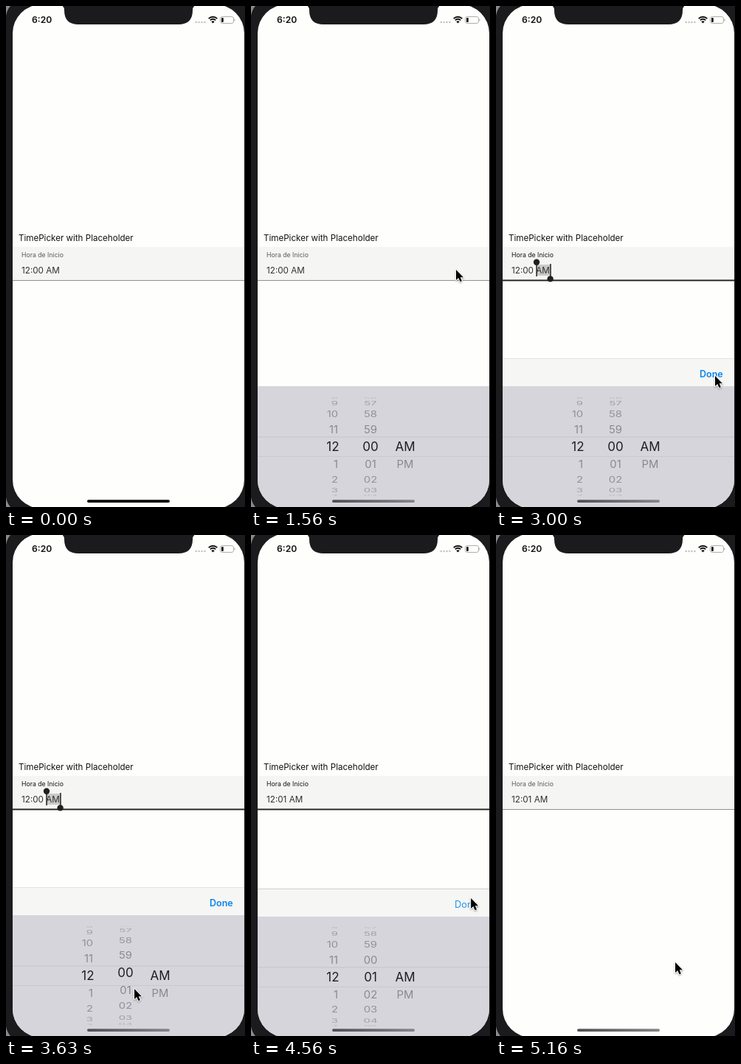
An HTML page with a canvas that plays this animation: 324x680 px, repeating every 5.2 s.

```html
<!DOCTYPE html>
<html lang="es">
<head>
<meta charset="utf-8">
<title>TimePicker</title>
<style>
html, body { margin: 0; width: 100%; height: 100%; overflow: hidden; background: #1b1b1d; }
canvas { display: block; width: 324px; height: 680px; }
</style>
</head>
<body>
<canvas id="stage"></canvas>
<script>
const W = 324, H = 680, LOOP = 5200;
const canvas = document.getElementById('stage');
const ctx = canvas.getContext('2d');
const dpr = window.devicePixelRatio || 1;
canvas.width = W * dpr;
canvas.height = H * dpr;

const FONT = 'Inter, Roboto, sans-serif';
const OPEN = 1560, PICK = 3600, COMMIT = 4420, CLOSE = 4560;

// Pointer path: time, x, y
const PATH = [
  [60, 318, 351], [160, 295, 355], [300, 295, 355], [430, 278, 358],
  [1975, 278, 358], [2000, 309, 487], [2030, 295, 484], [2190, 295, 484],
  [2330, 283, 595], [2600, 66, 358], [2710, 66, 358], [2990, 297, 502],
  [3050, 297, 502], [3230, 208, 599], [3430, 174, 616], [3950, 174, 616],
  [4150, 297, 493], [4550, 298, 493], [4700, 300, 493], [5060, 305, 642],
  [5160, 243, 580]
];

const clamp = v => Math.max(0, Math.min(1, v));
const ramp = (t, a, b) => clamp((t - a) / (b - a));
const smooth = k => k * k * (3 - 2 * k);
const mix = (a, b, k) => a + (b - a) * k;
const gray = v => `rgb(${v},${v},${v})`;

function rect(x, y, w, h, fill) {
  ctx.fillStyle = fill;
  ctx.fillRect(x, y, w, h);
}

function text(str, x, y, size, fill, weight = 400, align = 'left') {
  ctx.font = `${weight} ${size}px ${FONT}`;
  ctx.textAlign = align;
  ctx.fillStyle = fill;
  ctx.fillText(str, x, y);
}

function disc(x, y, r, fill) {
  ctx.beginPath();
  ctx.arc(x, y, r, 0, Math.PI * 2);
  ctx.fillStyle = fill;
  ctx.fill();
}

function pill(x, y, w, h, r) {
  ctx.beginPath();
  ctx.roundRect(x, y, w, h, r);
}

function clipBox(x, y, w, h, draw) {
  ctx.save();
  ctx.beginPath();
  ctx.rect(x, y, w, h);
  ctx.clip();
  draw();
  ctx.restore();
}

function bezel() {
  rect(0, 0, W, H, '#1b1b1d');
  ctx.fillStyle = '#8b8b8d';
  for (const [y, d] of [[0, 1], [H, -1]]) {
    ctx.beginPath();
    ctx.moveTo(0, y);
    ctx.lineTo(6, y);
    ctx.quadraticCurveTo(1.5, y + 5 * d, 0, y + 13 * d);
    ctx.fill();
  }
}

function notch() {
  ctx.beginPath();
  ctx.moveTo(72, -2);
  ctx.quadraticCurveTo(79, -1, 79, 6);
  ctx.bezierCurveTo(79, 19, 86, 25, 98, 25);
  ctx.lineTo(234, 25);
  ctx.bezierCurveTo(246, 25, 253, 19, 253, 6);
  ctx.quadraticCurveTo(253, -1, 260, -2);
  ctx.fillStyle = '#1b1b1d';
  ctx.fill();
}

function statusBar() {
  text('6:20', 35, 23.3, 12.2, '#111', 600);
  for (let i = 0; i < 4; i++) disc(257.7 + i * 3.9, 22, 1.3, '#c4c4c4');

  ctx.strokeStyle = '#111';
  ctx.lineWidth = 1.9;
  for (const r of [8.2, 5.2]) {
    ctx.beginPath();
    ctx.arc(280.5, 23, r, -Math.PI * 0.75, -Math.PI * 0.25);
    ctx.stroke();
  }
  ctx.beginPath();
  ctx.moveTo(280.5, 23.6);
  ctx.arc(280.5, 23.6, 3.2, -Math.PI * 0.75, -Math.PI * 0.25);
  ctx.fillStyle = '#111';
  ctx.fill();

  pill(290.5, 14.5, 18, 9, 2.6);
  ctx.strokeStyle = '#adadad';
  ctx.lineWidth = 1;
  ctx.stroke();
  rect(309.4, 17.5, 1, 3, '#adadad');
  pill(292, 16, 2.8, 6, 0.8);
  ctx.fillStyle = '#111';
  ctx.fill();
}

function selection(s) {
  const ink = '#202022';
  ctx.globalAlpha = clamp(s * 2);
  rect(55, 351, 19, 15, '#c9c9c9');
  rect(54.3, 350, 1.5, 17, ink);
  rect(73.2, 350, 1.5, 18, ink);
  const r = 4.2 * (s + 0.9 * s * (1 - s));
  disc(55, 347.8, r, ink);
  disc(73.6, 370.4, r, ink);
  ctx.globalAlpha = 1;
}

function field(t, focus) {
  text('TimePicker with Placeholder', 17, 318.5, 11.6, '#111');
  rect(9, 327, 314, 45.5, '#f5f5f4');
  text('Hora de Inicio', 21, 341.4, 8.7, gray(mix(90, 20, focus)));
  rect(9, 372 - 0.5 * focus, 314, 1 + 0.9 * focus, gray(mix(145, 32, focus)));
  if (t >= 2650 && t < COMMIT) selection(smooth(ramp(t, 2640, 2750)));
  text(t < COMMIT ? '12:00 AM' : '12:01 AM', 21, 363, 11.7, '#303032');
}

const hour = i => String((i + 11 + 120) % 12 + 1);
const minute = i => String((i + 60) % 60).padStart(2, '0');
const period = i => ['AM', 'PM'][i] || '';

// One wheel: rows sit on a cylinder seen from the front
function wheel(label, pos, x, align, big) {
  const size = big ? 17 : 14.8;
  const base = Math.round(pos);
  for (let i = base - 4; i <= base + 4; i++) {
    const a = (i - pos) * 0.36;
    const c = Math.cos(a);
    if (c <= 0) continue;
    ctx.save();
    ctx.translate(x, 598.3 + 67 * Math.sin(a));
    ctx.scale(1, c);
    const ink = big ? '#1f1f21' : `rgba(55,55,62,${0.5 * Math.sqrt(c)})`;
    text(label(i), 0, size * 0.364, size, ink, 400, align);
    ctx.restore();
  }
}

function wheels(pos, big) {
  wheel(hour, 12, big ? 119.5 : 118, 'right', big);
  wheel(minute, pos, 162, 'center', big);
  wheel(period, 0, 209, 'center', big);
}

function keyboard(t, focus) {
  if (t < OPEN) return;
  const out = 1 - Math.pow(1 - ramp(t, CLOSE, CLOSE + 320), 3);
  if (out >= 1) return;
  const pos = smooth(ramp(t, PICK - 20, PICK + 160));
  ctx.save();
  ctx.translate(0, 202 * out);

  ctx.globalAlpha = t < CLOSE ? focus : 1;
  rect(9, 478, 314, 38, '#f6f6f5');
  rect(9, 478, 314, 1, gray(t < CLOSE ? 228 : 205));
  const closing = t >= CLOSE;
  text('Done', 276, 504, closing ? 12.8 : 12.5, closing ? '#2196f0' : '#0a84ec', closing ? 400 : 600);
  ctx.globalAlpha = 1;

  rect(9, 516, 314, 170, '#d6d5dc');
  clipBox(9, 516, 314, 69, () => wheels(pos, false));
  clipBox(9, 611, 314, 75, () => wheels(pos, false));
  clipBox(9, 585, 314, 26, () => wheels(pos, true));
  rect(9, 584.5, 314, 1, '#c3c3c9');
  rect(9, 611, 314, 1, '#c9c9cf');
  ctx.restore();
}

function homeBar(t) {
  let ink = '#000';
  if (t >= OPEN) {
    ink = ctx.createLinearGradient(110, 0, 222, 0);
    ink.addColorStop(0, '#505054');
    ink.addColorStop(1, '#85858a');
  }
  pill(110, 670.2, 112, 3.8, 1.9);
  ctx.fillStyle = ink;
  ctx.fill();
}

function pointer(t) {
  if (t < PATH[0][0]) return;
  let n = 1;
  while (n < PATH.length - 1 && PATH[n][0] < t) n++;
  const [t0, x0, y0] = PATH[n - 1], [t1, x1, y1] = PATH[n];
  const k = ramp(t, t0, t1);
  ctx.save();
  ctx.translate(mix(x0, x1, k), mix(y0, y1, k));
  ctx.beginPath();
  const shape = [0, 0, 0, 14, 3.2, 11, 5.5, 16.3, 7.9, 15.2, 5.7, 10.2, 10, 10.2];
  for (let i = 0; i < shape.length; i += 2) ctx.lineTo(shape[i], shape[i + 1]);
  ctx.closePath();
  ctx.lineJoin = 'round';
  ctx.lineWidth = 2;
  ctx.strokeStyle = '#fff';
  ctx.shadowColor = 'rgba(0,0,0,.35)';
  ctx.shadowBlur = 2 * dpr;
  ctx.shadowOffsetY = dpr;
  ctx.stroke();
  ctx.shadowColor = 'transparent';
  ctx.fillStyle = '#000';
  ctx.fill();
  ctx.restore();
}

function draw(t) {
  const focus = ramp(t, 1600, 1700) * (1 - ramp(t, CLOSE, CLOSE + 90));
  ctx.setTransform(dpr, 0, 0, dpr, 0, 0);
  bezel();
  ctx.save();
  pill(9, -2, 314, 684, 39);
  ctx.clip();
  rect(9, -2, 314, 684, '#fefefd');
  statusBar();
  field(t, focus);
  keyboard(t, focus);
  homeBar(t);
  notch();
  ctx.restore();
  pointer(t);
}

const start = performance.now();
function tick() {
  draw((performance.now() - start) % LOOP);
  requestAnimationFrame(tick);
}
tick();
</script>
</body>
</html>
```
